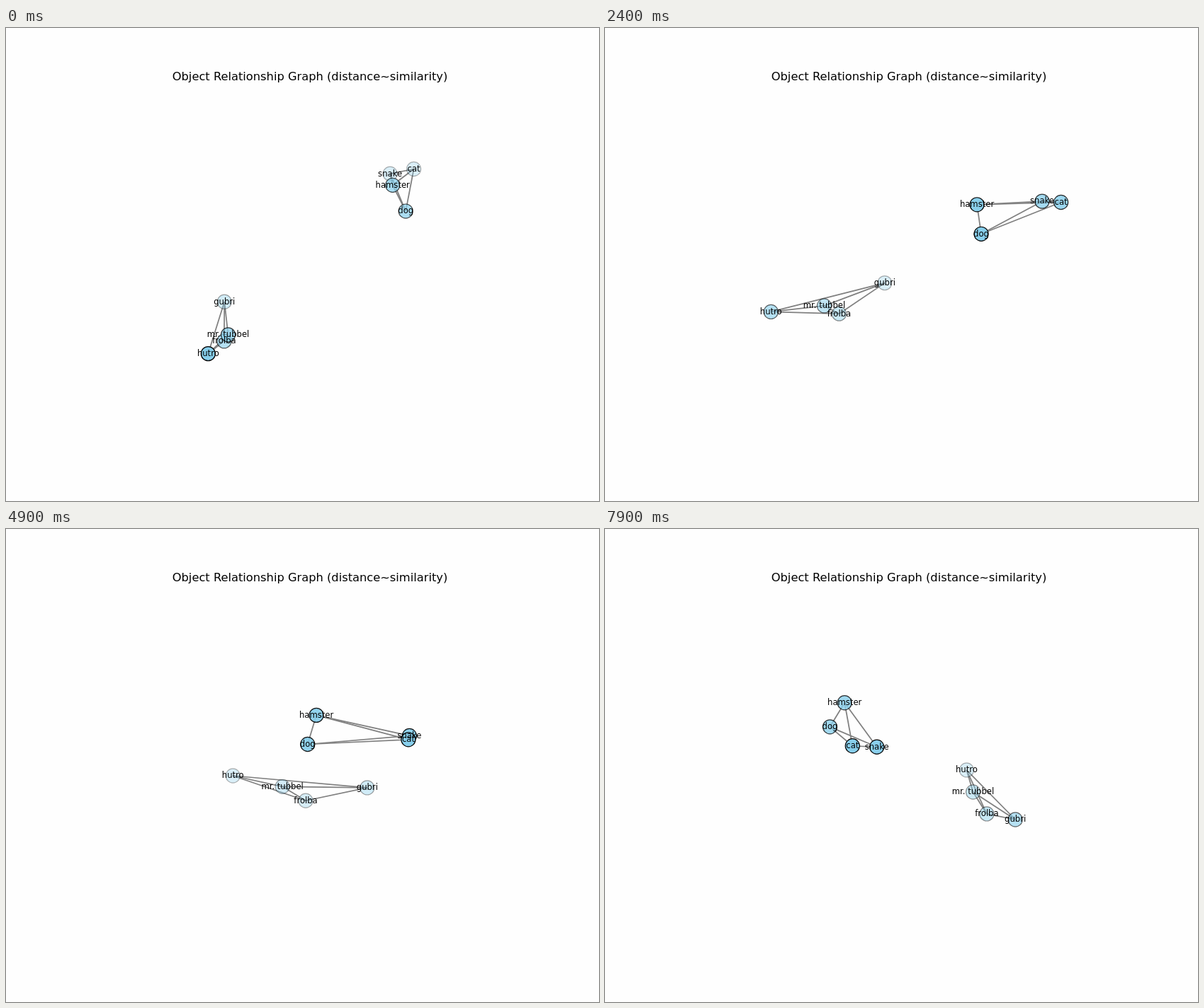
An HTML page with a canvas that plays this animation: 837x669 px, repeating every 8 s.

```html
<!DOCTYPE html>
<html lang="en">
<head>
<meta charset="utf-8">
<title>Object Relationship Graph</title>
<style>
  html, body { margin: 0; width: 100%; height: 100%; overflow: hidden; background: #fefefe; }
  canvas { display: block; }
</style>
</head>
<body>
<canvas id="stage" width="837" height="669"></canvas>
<script>
const ctx = document.getElementById('stage').getContext('2d');
const FONT = '"DejaVu Sans", Verdana, sans-serif';
const CENTER = { x: 435.9, y: 330.9 };
const DISTANCE = 2784;              // viewer distance in pixels
const RAD = Math.PI / 180;
const SIN_E = Math.sin(20 * RAD), COS_E = Math.cos(20 * RAD);
const STEP = 100, STEPS = 80, TURN = 2 * RAD;

// Each node: label, ground position (a, b), height z
const groups = [
  [
    ['dog', 127.5, 8.2, 73],
    ['hamster', 109, 17.4, 108.4],
    ['cat', 144.9, 144.8, 92.4],
    ['snake', 110.2, 143, 85.7]
  ],
  [
    ['gubri', -131.5, 60, -83.6],
    ['mr. tubbel', -120.9, -65.7, -84.4],
    ['frolba', -128.3, -31.8, -107.9],
    ['hutro', -144.7, -144.7, -80]
  ]
];

function project([label, a, b, z], angle) {
  const cos = Math.cos(angle), sin = Math.sin(angle);
  const across = a * cos + b * sin;
  const toward = a * sin - b * cos;
  const near = toward * COS_E + z * SIN_E;
  const scale = DISTANCE / (DISTANCE - near);
  return {
    label, near,
    x: CENTER.x + across * scale,
    y: CENTER.y + (toward * SIN_E - z * COS_E) * scale
  };
}

function drawEdges(nodes) {
  ctx.strokeStyle = '#808080';
  ctx.lineWidth = 1.74;
  nodes.forEach((p, i) => nodes.slice(i + 1).forEach(q => {
    ctx.beginPath();
    ctx.moveTo(p.x, p.y);
    ctx.lineTo(q.x, q.y);
    ctx.stroke();
  }));
}

// Far nodes fade, down to 30 % for the farthest
function drawNodes(nodes) {
  const sorted = [...nodes].sort((p, q) => p.near - q.near);
  const min = sorted[0].near, max = sorted[sorted.length - 1].near;
  ctx.fillStyle = '#87ceeb';
  ctx.strokeStyle = '#000';
  ctx.lineWidth = 1.2;
  for (const p of sorted) {
    ctx.globalAlpha = 0.3 + 0.7 * (p.near - min) / (max - min);
    ctx.beginPath();
    ctx.arc(p.x, p.y, 10.05, 0, 2 * Math.PI);
    ctx.fill();
    ctx.stroke();
  }
  ctx.globalAlpha = 1;
}

function drawText(text, x, y, size) {
  ctx.font = `${size}px ${FONT}`;
  ctx.fillText(text, x, y);
}

function draw(now) {
  const angle = Math.floor(now / STEP) % STEPS * TURN;
  const placed = groups.map(group => group.map(node => project(node, angle)));
  const nodes = placed.flat();

  ctx.fillStyle = '#fefefe';
  ctx.fillRect(0, 0, 837, 669);
  placed.forEach(drawEdges);
  drawNodes(nodes);

  ctx.fillStyle = '#000';
  ctx.textAlign = 'center';
  nodes.forEach(p => drawText(p.label, p.x, p.y + 3.35, 11.62));
  drawText('Object Relationship Graph (distance~similarity)', 429, 73.5, 16.28);
}

const start = performance.now();
function tick() {
  draw(performance.now() - start);
  requestAnimationFrame(tick);
}
tick();
</script>
</body>
</html>
```
